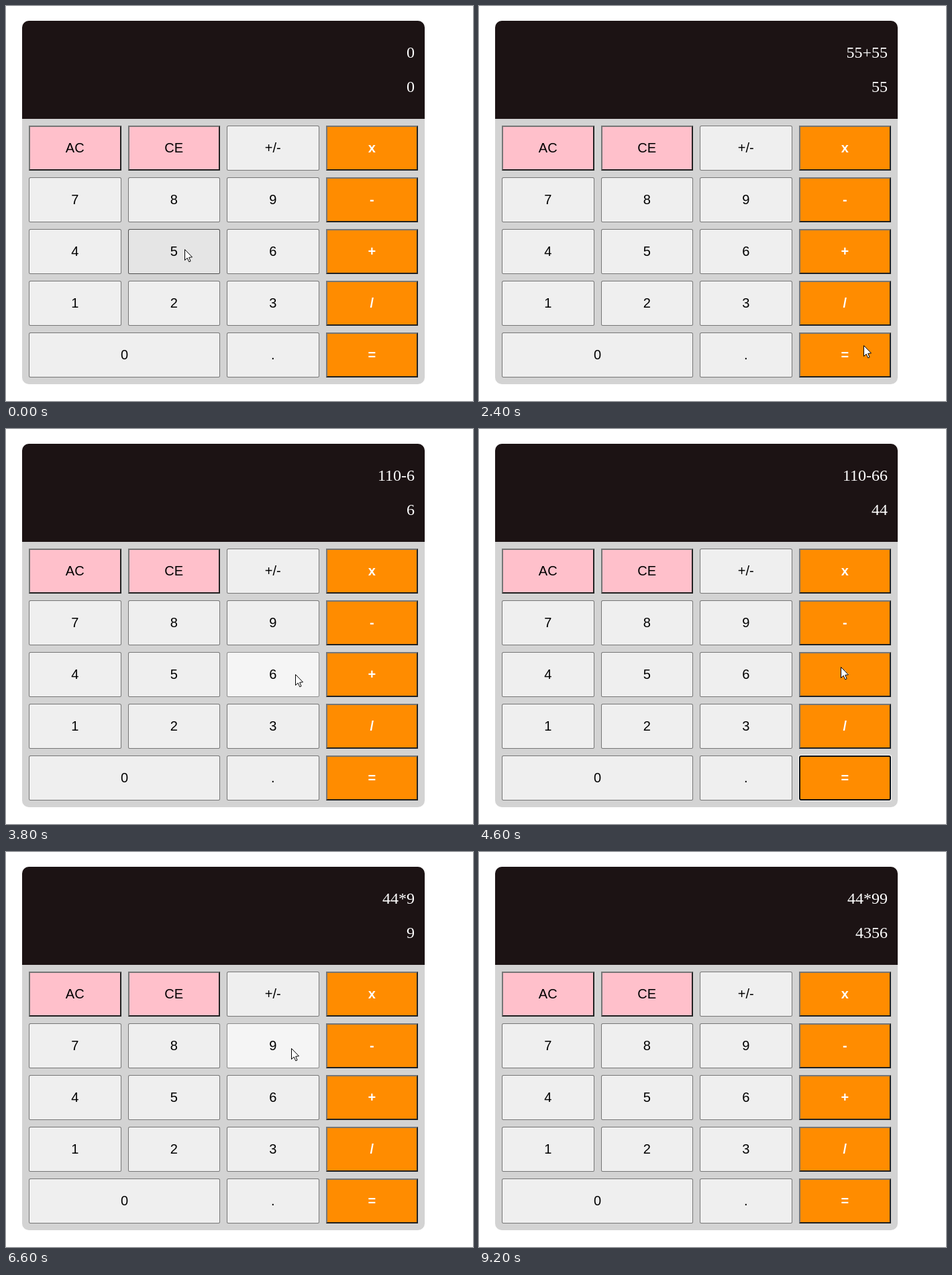
Animation, 696 px wide and 588 px high, one loop 9400 ms. Source, as an HTML page with a canvas:

```html
<!DOCTYPE html>
<html lang="en">
<head>
<meta charset="utf-8">
<title>Calculator</title>
<style>
  html, body { margin: 0; width: 100%; height: 100%; overflow: hidden; background: #fff; }
  canvas { display: block; }
</style>
</head>
<body>
<canvas id="stage" width="696" height="588"></canvas>
<script>
const ctx = document.getElementById('stage').getContext('2d');
const LOOP = 9400;

// Each step lists only what changes; "press" lasts for its own step.
const steps = [
  { t: 0, lines: ['0', '0'], at: [266, 362], shown: true, focus: '' },
  { t: 200, shown: false },
  { t: 1000, lines: ['5', '5'], shown: true, press: '5' },
  { t: 1200, lines: ['55', '55'], press: '5' },
  { t: 1400, at: [400, 372] },
  { t: 1600, lines: ['55+', '+'], at: [521, 374], focus: '+' },
  { t: 1800, lines: ['55+5', '5'], at: [270, 366], focus: '', press: '5' },
  { t: 2000, lines: ['55+55', '55'], press: '5' },
  { t: 2200, at: [430, 440] },
  { t: 2400, at: [573, 505] },
  { t: 2600, lines: ['55+55', '110'], focus: '=' },
  { t: 2800, at: [560, 400] },
  { t: 3000, at: [548, 290], focus: '-' },
  { t: 3200, lines: ['110-', '-'] },
  { t: 3400, at: [440, 350] },
  { t: 3600, at: [431, 365] },
  { t: 3800, lines: ['110-6', '6'], focus: '', press: '6' },
  { t: 4000, lines: ['110-66', '66'], press: '6' },
  { t: 4200, lines: ['110-66', '44'], at: [573, 510], focus: '=' },
  { t: 4400, at: [557, 415] },
  { t: 4600, at: [539, 354] },
  { t: 4800, shown: false },
  { t: 5400, at: [545, 330], shown: true },
  { t: 5600, at: [550, 250] },
  { t: 5800, at: [551, 214], focus: 'x' },
  { t: 6000, lines: ['44*', '*'] },
  { t: 6200, at: [450, 270] },
  { t: 6400, at: [425, 292] },
  { t: 6600, lines: ['44*9', '9'], focus: '', press: '9' },
  { t: 6800, lines: ['44*99', '99'], press: '9' },
  { t: 7000, at: [510, 430] },
  { t: 7200, at: [576, 516] },
  { t: 7400, lines: ['44*99', '4356'], focus: '=' },
  { t: 7600, at: [440, 516] },
  { t: 7800, at: [250, 520] },
  { t: 8000, at: [531, 520] },
  { t: 8200, shown: false },
  { t: 9200, focus: '' }
];

const rows = [
  ['AC', 'CE', '+/-', 'x'],
  ['7', '8', '9', '-'],
  ['4', '5', '6', '+'],
  ['1', '2', '3', '/'],
  ['0', null, '.', '=']
];

const keys = rows.flatMap((row, r) => row.map((label, c) => {
  if (!label) return null;
  const left = 34 + c * 147.5;
  const right = left + (label === '0' ? 285 : 137.5);
  const x = Math.round(left);
  return {
    label, x, y: 178 + r * 77, w: Math.round(right) - x, h: 67,
    mid: (left + right) / 2,
    fill: c === 3 ? '#ff8c00' : label.length === 2 ? '#ffc0cb' : null,
    bold: c === 3
  };
})).filter(Boolean);

const nativeLook = {
  rest: ['#efefef', '#767676'],
  hover: ['#e5e5e5', '#4f4f4f'],
  press: ['#f5f5f5', '#8d8d8d']
};

function stateAt(time) {
  const state = {};
  for (const step of steps) {
    if (step.t > time) break;
    Object.assign(state, { press: '' }, step);
  }
  return state;
}

function polygon(points, color) {
  ctx.beginPath();
  points.forEach(([x, y]) => ctx.lineTo(x, y));
  ctx.closePath();
  ctx.fillStyle = color;
  ctx.fill();
}

function box(x, y, w, h, radius, color) {
  ctx.beginPath();
  ctx.roundRect(x, y, w, h, radius);
  ctx.fillStyle = color;
  ctx.fill();
}

function bevel({ x, y, w, h, fill }) {
  const r = x + w, b = y + h;
  ctx.fillStyle = '#767676';
  ctx.fillRect(x, y, w, h);
  polygon([[r, y], [r, b], [x, b], [x + 2, b - 2], [r - 2, b - 2], [r - 2, y + 2]], '#212121');
  ctx.fillStyle = fill;
  ctx.fillRect(x + 2, y + 2, w - 4, h - 4);
}

function focusRing({ x, y, w, h, fill }) {
  box(x - 1, y - 1, w + 2, h + 2, 3, '#fff');
  box(x, y, w, h, 3, '#101010');
  box(x + 2, y + 2, w - 4, h - 4, 1, fill);
}

function drawKey(key, state) {
  const { label, x, y, w, h } = key;
  if (key.fill) {
    (state.focus === label ? focusRing : bevel)(key);
  } else {
    const [px, py] = state.at;
    const over = px >= x && px < x + w && py >= y && py < y + h;
    const [face, edge] = nativeLook[state.press === label ? 'press' : over ? 'hover' : 'rest'];
    box(x, y, w, h, 2.5, edge);
    box(x + 1, y + 1, w - 2, h - 2, 1.5, face);
  }
  ctx.font = (key.bold ? 'bold ' : '') + '20px "Liberation Sans", Arial, sans-serif';
  ctx.textAlign = 'center';
  ctx.fillStyle = key.bold ? '#fff' : '#000';
  ctx.fillText(label, key.mid, y + 40);
}

function drawCursor([x, y]) {
  ctx.save();
  ctx.translate(x + 0.5, y + 0.5);
  polygon([[0, 0], [0, 16], [3.7, 12.6], [6.3, 18.3], [8.6, 17.3], [6.2, 11.8], [11, 11.3]], '#fff');
  ctx.strokeStyle = '#000';
  ctx.lineWidth = 1;
  ctx.stroke();
  ctx.restore();
}

function draw(time) {
  const state = stateAt(time);
  ctx.fillStyle = '#fff';
  ctx.fillRect(0, 0, 696, 588);
  box(24, 22, 600, 541, 10, '#d3d3d3');
  box(24, 22, 600, 146, [10, 10, 0, 0], '#1c1314');

  ctx.font = '24px "Liberation Serif", "Times New Roman", serif';
  ctx.textAlign = 'right';
  ctx.fillStyle = '#fff';
  state.lines.forEach((line, i) => ctx.fillText(line, 609, 77 + i * 51));

  keys.forEach(key => drawKey(key, state));
  if (state.shown) drawCursor(state.at);
}

const start = performance.now();
function tick() {
  draw((performance.now() - start) % LOOP);
  requestAnimationFrame(tick);
}
tick();
</script>
</body>
</html>
```
